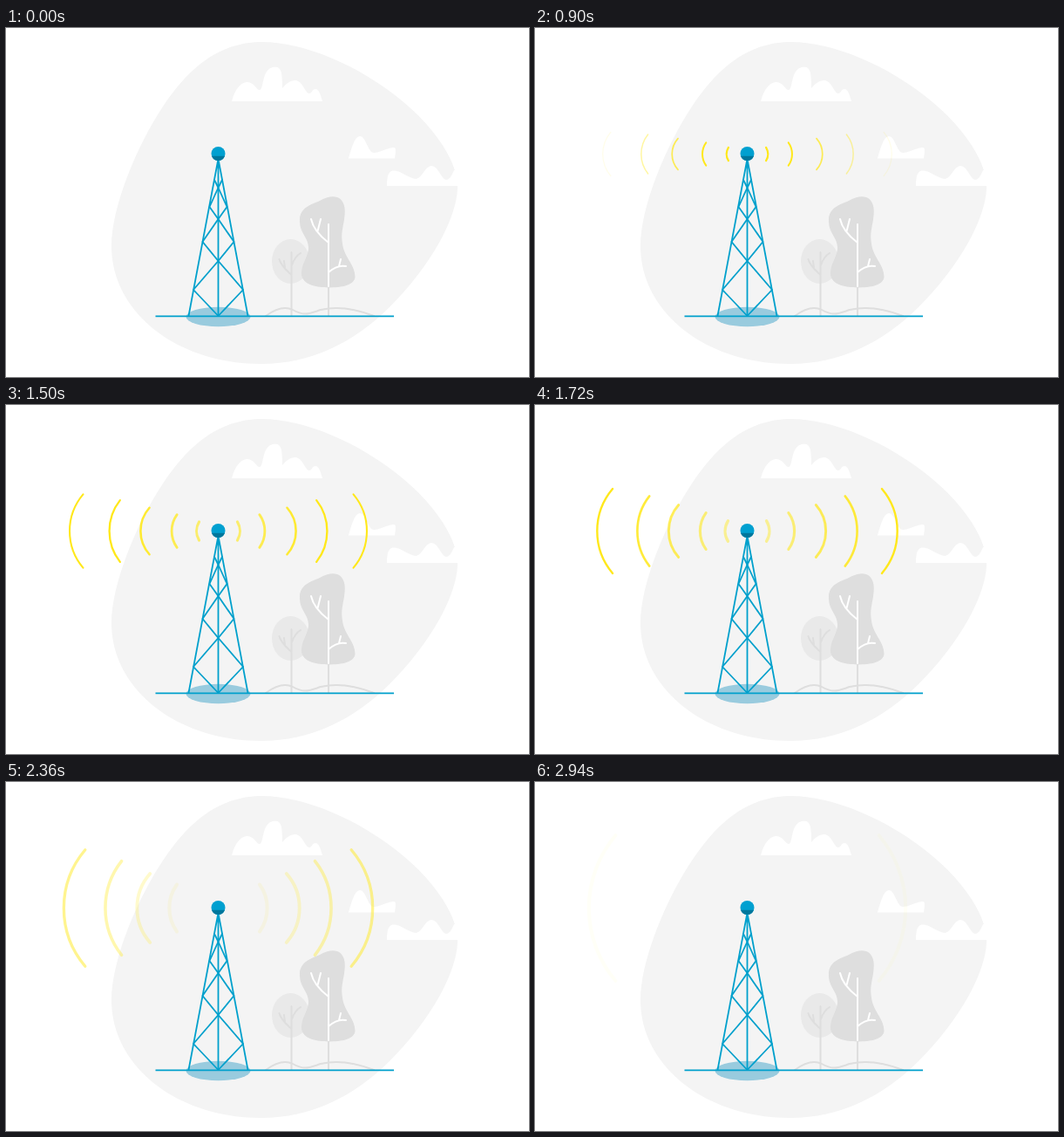
Write an HTML page that moves like this. It is 600 px wide and 400 px high and loops after 3400 ms.

```html
<!DOCTYPE html>
<html lang="en">
<head>
<meta charset="utf-8">
<title>Radio tower</title>
<style>
  html, body { margin: 0; height: 100%; overflow: hidden; background: #fff; }
  svg { display: block; width: 600px; height: 400px; }
</style>
</head>
<body>
<svg viewBox="0 0 600 400" fill="none" stroke-linecap="round" stroke-linejoin="round">
  <path fill="#f4f4f4" d="M294 16C340 16 405 42 455 84C495 117 518 155 518 182C518 215 490 270 440 320C400 360 350 385 293 385C195 385 121 325 121 250C121 205 150 135 180 90C210 45 245 16 294 16Z"/>

  <g id="clouds" fill="#fff">
    <path d="M259 84C262 72 268 63 276 62C284 61 287 71 291 71C296 71 293 48 306 45C316 43 317 50 317 69C321 64 326 60 332 60C341 61 343 75 348 75C351 75 351 70 355 70C359 70 361 77 363 84Z"/>
    <path d="M393 149.5C396 139 400 124 406 124C413 124 415 143 422 143C430 143 437 137 445 137C448 137 447 143 446 149.5Z"/>
    <path d="M437 181C437 172 438 164 444 163.500C453 163 461 172 470 173C477 173 481 158 488 158C496 158 499 173 505 174C509 174 512 168 514 163L520 163V181Z"/>
  </g>

  <g id="trees" stroke="#dedede" stroke-width="2">
    <ellipse cx="326.500" cy="267.500" rx="21.500" ry="25.500" fill="#e9e9e9" stroke="none"/>
    <path d="M327.500 257V330M313.500 265Q315 272 327.500 283M319 267L320 275M327.500 273Q331 262 338 258"/>
    <path fill="#dedede" stroke="none" d="M337 222C336 207 348 203 360 198C372 191 386 190 388.500 206C390 222 383 232 386 247C388 264 400 270 400.500 285C400 295 385 297.500 370 297.500C352 297 339 293 339 281C339 270 347 262 347 252C347 240 337 235 337 222Z"/>
    <path d="M370 297V330M298 330C309 322 319 318 329 323C343 331 349 327 361 323C382 318 404 323 422 330"/>
    <path stroke="#fff" d="M370 225V296M350 219Q353 233 370 246M361 219L357.500 233M370 280Q380 271 390 273M382 273L384 265"/>
  </g>

  <g id="tower" stroke="#00a0cc" stroke-width="1.800">
    <ellipse cx="243.500" cy="331" rx="37" ry="11.200" fill="#99cbde" stroke="none"/>
    <path stroke-linecap="butt" d="M171.500 330.300H445"/>
    <path d="M209.500 330L243.500 150L277.500 330M243.500 150V330"/>
    <path d="M243.500 330L215 300L243.500 267L225.500 245L243.500 219L233.500 205L243.500 183L239 174"/>
    <path d="M243.500 330L272 300L243.500 267L261.500 245L243.500 219L253.500 205L243.500 183L248 174"/>
    <circle cx="243.500" cy="144" r="8" fill="#00a0d0" stroke="none"/>
    <path fill="#00779c" stroke="none" d="M236 146.700H251A8 8 0 0 1 236 146.700Z"/>
  </g>

  <g id="waves" stroke="#ffe81a" stroke-width="4.200"></g>
</svg>
<script>
  const LOOP = 3400, STEP = 20, LAST = 2940;
  const START = 165, STAGGER = 172, LIFE = 2130;
  const CX = 243.5, CY = 144.5;

  // distance from the mast, tip x, apex x, half height
  const shapes = [
    [20.5, 2, 6, 14.5],
    [47, 0.5, 9.5, 28],
    [80.5, -2.5, 14, 43.5],
    [116, -6, 16, 63.5],
    [159, -8, 23, 84.5]
  ];

  const group = document.getElementById('waves');
  const waves = shapes.flatMap(([dist, tip, apex, half], order) => {
    const sag = apex - tip;
    const r = (half * half + sag * sag) / (2 * sag);
    return [-1, 1].map(side => {
      const el = document.createElementNS('http://www.w3.org/2000/svg', 'path');
      el.setAttribute('d', `M${tip} ${-half}A${r} ${r} 0 0 1 ${tip} ${half}`);
      group.append(el);
      return { el, dist, side, order };
    });
  });

  const clamp = v => Math.max(0, Math.min(1, v));

  function draw(now) {
    const t = Math.min(LAST, Math.floor(now % LOOP / STEP) * STEP);
    for (const { el, dist, side, order } of waves) {
      const p = clamp((t - START - order * STAGGER) / LIFE);
      const scale = 0.28 + 0.72 * p;
      el.setAttribute('transform',
        `translate(${CX + side * dist} ${CY}) scale(${side * scale} ${scale})`);
      el.setAttribute('opacity', Math.min(clamp(p / 0.25), clamp((1 - p) / 0.6)));
    }
  }

  const begin = performance.now();
  function tick() {
    draw(performance.now() - begin);
    requestAnimationFrame(tick);
  }
  tick();
</script>
</body>
</html>
```
